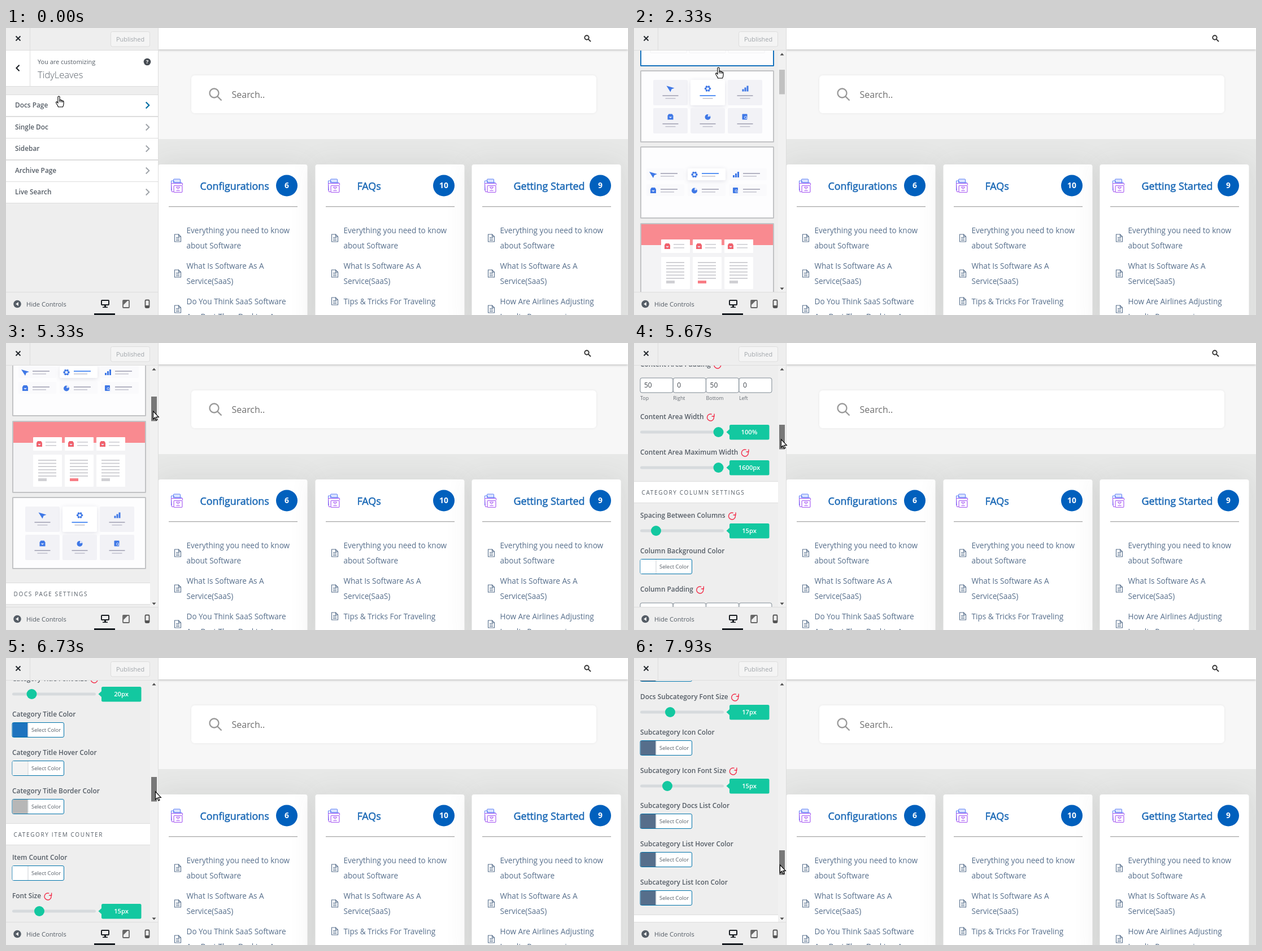
Recreate the animation shown at these times as an HTML page with a canvas. Size 1101 px wide and 509 px high, loop 8000 ms.

```html
<!DOCTYPE html>
<html lang="en">
<head>
<meta charset="utf-8">
<title>Docs page customizer</title>
<style>
html, body { margin: 0; width: 100%; height: 100%; overflow: hidden; }
canvas { display: block; width: 1101px; height: 509px; }
</style>
</head>
<body>
<canvas id="stage" width="1101" height="509"></canvas>
<script>
const g = document.getElementById('stage').getContext('2d');
const LOOP = 8000, STEPS_PER_MS = 0.015;
const BLUE = '#0073aa', GREEN = '#13c8a0', SLATE = '#566e8b', LINE = '#dddddd', LABEL = '#555d66';
const BRAND = 'TidyLeaves';

// ---- helpers ----
function rect(x, y, w, h, fill) { g.fillStyle = fill; g.fillRect(x, y, w, h); }

function box(x, y, w, h, r, fill, stroke, lw = 1) {
  g.beginPath();
  g.roundRect(x, y, w, h, r);
  if (fill) { g.fillStyle = fill; g.fill(); }
  if (stroke) { g.strokeStyle = stroke; g.lineWidth = lw; g.stroke(); }
}

function disc(x, y, r, fill) {
  g.beginPath(); g.arc(x, y, r, 0, 7); g.fillStyle = fill; g.fill();
}

function poly(color, lw, ...p) {
  g.beginPath();
  for (let i = 0; i < p.length; i += 2) g.lineTo(p[i], p[i + 1]);
  if (lw) { g.strokeStyle = color; g.lineWidth = lw; g.stroke(); }
  else { g.fillStyle = color; g.fill(); }
}

// y is the middle of the capitals; the baseline sits on a whole pixel
const baseline = (y, size) => Math.round(y + size * 0.36);

function text(s, x, y, size, color, weight = 400, align = 'left') {
  g.font = `${weight} ${size}px "Open Sans", "Noto Sans", sans-serif`;
  g.textAlign = align;
  g.fillStyle = color;
  g.fillText(s, x, baseline(y, size));
}

function chevron(x, y, dir, h, color) {
  poly(color, 2, x - dir * h * 0.5, y - h, x + dir * h * 0.5, y, x - dir * h * 0.5, y + h);
}

function withAlpha(a, draw) { g.save(); g.globalAlpha = a; draw(); g.restore(); }

function withShadow(color, blur, dy, draw) {
  g.save();
  g.shadowColor = color; g.shadowBlur = blur; g.shadowOffsetY = dy;
  draw();
  g.restore();
}

function track(keys, n) {
  let i = keys.findIndex(k => k[0] > n);
  if (i < 0) return keys[keys.length - 1].slice(1);
  if (i === 0) return keys[0].slice(1);
  const a = keys[i - 1], b = keys[i], p = (n - a[0]) / (b[0] - a[0]);
  return a.slice(1).map((v, j) => v + (b[j + 1] - v) * p);
}

const clamp = v => Math.max(0, Math.min(1, v));
const between = (n, a, b) => n >= a && n < b;

// ---- preview page ----
const columns = [
  [269.5, 'Configurations', '6', 'Do You Think SaaS Software', 'Are Best Than Desktop A'],
  [547.5, 'FAQs', '10', 'Tips & Tricks For Traveling', ''],
  [824.5, 'Getting Started', '9', 'How Are Airlines Adjusting', 'Loyalty Programming']
];

function magnifier(x, y, r, tail, lw, color) {
  g.beginPath(); g.arc(x, y, r, 0, 7);
  g.strokeStyle = color; g.lineWidth = lw; g.stroke();
  poly(color, lw, x + r * 0.7, y + r * 0.7, x + tail, y + tail);
}

function docIcon(x, y) {
  poly(SLATE, 1.1, x + 7, y - 6.5, x, y - 6.5, x, y + 6.5, x + 11, y + 6.5, x + 11, y - 2.5, x + 7, y - 6.5, x + 7, y - 2.5, x + 11, y - 2.5);
  for (const dy of [-1, 1.5, 4]) poly(SLATE, 1, x + 2.5, y + dy, x + 8.5, y + dy);
}

function folderIcon(x) {
  const violet = '#a558f2', blue = '#5b7cf6';
  box(x + 4, 268, 12, 7, 1, '#dbe5ff', blue, 1);
  poly(blue, 1, x, 288, x, 271, x + 4, 271, x + 6, 274, x + 19, 274);
  poly(violet, 1, x, 275.5, x + 20, 275.5, x + 20, 279);
  poly(violet, 1, x, 275.5, x + 1, 290.5, x + 5, 290.5);
  box(x + 4.5, 279.5, 15, 12, 1.5, '#fcf6ff', violet, 1.1);
  poly(violet, 1, x + 9, 282, x + 15, 282, x + 12, 286, x + 9, 282);
  poly(violet, 1, x + 9, 288.5, x + 15, 288.5);
}

function column([x, title, count, last1, last2]) {
  withShadow('rgba(70,75,75,.11)', 48, 0, () => box(x, 242, 264, 300, 4, '#fff'));
  folderIcon(x + 23);
  text(title, x + 74, 280.6, 17.85, '#1b69b6');
  g.strokeStyle = '#1b69b6'; g.lineWidth = 0.55;
  g.strokeText(title, x + 74, baseline(280.6, 17.85));
  disc(x + 227.5, 279.5, 19, '#0160bd');
  text(count, x + 227.5, 279, 13.8, '#fff', 700, 'center');
  rect(x + 18.5, 316, 228, 1.4, '#aeaeae');
  const lines = ['Everything you need to know', 'about Software', 'What Is Software As A', 'Service(SaaS)', last1, last2];
  const ys = [359, 386, 422, 449, 485, 512];
  lines.forEach((s, i) => text(s, x + 50, ys[i], 13.55, SLATE));
  docIcon(x + 29, 372.5);
  docIcon(x + 29, 435.5);
  docIcon(x + 29, last2 ? 498.5 : 484.5);
}

function preview() {
  rect(269, 38, 832, 159, '#f7f7f7');
  rect(269, 197, 832, 312, '#e7e8e7');
  withShadow('rgba(0,0,0,.28)', 4, 1, () => rect(269, 0, 832, 38, '#fff'));
  magnifier(1028, 17, 3.7, 7, 1.9, '#333');
  withShadow('rgba(0,0,0,.07)', 4, 0, () => box(328, 84, 717, 67, 6, '#fff'));
  magnifier(368.5, 115.5, 8, 13, 2.3, '#9a9a9a');
  text('Search..', 399.5, 118, 16, '#707070');
  g.save();
  g.beginPath(); g.rect(269, 197, 832, 312); g.clip();
  columns.forEach(column);
  g.restore();
}

// ---- sidebar frame ----
function topBar() {
  rect(0, 0, 269, 40, '#eee');
  rect(0, 39, 269, 1, LINE);
  rect(42, 0, 1, 39, LINE);
  poly('#23282d', 2, 17.5, 14.5, 25.5, 22.5);
  poly('#23282d', 2, 25.5, 14.5, 17.5, 22.5);
  box(185.5, 6.5, 69, 26.5, 3, '#f4f4f4', LINE);
  text('Published', 195, 20, 10.9, '#a0a5aa');
}

function footer() {
  rect(0, 468, 269, 41, '#eee');
  rect(0, 468, 269, 1, LINE);
  disc(20, 489.5, 6.8, '#555d66');
  poly('#eee', 0, 22, 486, 22, 493, 17, 489.5);
  text('Hide Controls', 36, 489.5, 11.15, '#555d66');
  box(169, 483, 13, 8, 1, null, '#191e23', 2);
  rect(174, 491, 3, 4, '#191e23');
  rect(171, 494.5, 9, 1.6, '#191e23');
  rect(156, 506, 37, 3, '#191e23');
  box(207, 483, 11, 13, 1, null, '#666', 1.8);
  poly('#666', 0, 208, 484, 215, 484, 208, 491);
  box(246.5, 482.5, 7, 13.5, 1.5, null, '#555', 1.8);
  rect(246, 492, 8, 3, '#555');
  rect(269, 0, 1, 509, LINE);
}

function statusBar() {
  box(-1.5, 492.5, 142, 20, [0, 4, 0, 0], '#dfe2e7', '#b9bcc2');
  text('https://tidyleaves.co/upgrade', 4, 501.5, 9.4, '#444b52');
}

// ---- first panel ----
function row(name, y, hot) {
  rect(0, y - 19, 269, 38.5, hot ? '#f3f3f5' : '#fff');
  rect(0, y - 19, 269, 1, LINE);
  rect(0, y + 19, 269, 1, LINE);
  if (hot) rect(0, y - 18, 3.5, 37, BLUE);
  text(name, 16, y, 11.85, hot ? BLUE : LABEL, 600);
  chevron(250.5, y, 1, 5.5, hot ? BLUE : '#a0a5aa');
}

function rootPanel(hover) {
  rect(0, 40, 269, 428, '#eee');
  rect(0, 40, 269, 63, '#fff');
  rect(0, 103, 269, 1, LINE);
  rect(42, 40, 1, 63, LINE);
  chevron(21, 71, -1, 5.2, '#191e23');
  text('You are customizing', 56, 60, 10.95, LABEL);
  text(BRAND, 56, 83.5, 16.5, LABEL, 300);
  disc(250, 60, 6.3, '#464c53');
  text('?', 250, 60, 9.5, '#fff', 700, 'center');
  ['Docs Page', 'Single Doc', 'Sidebar', 'Archive Page', 'Live Search']
    .forEach((s, i) => row(s, Math.round(137 + i * 38.6), false));
  withAlpha(hover, () => row('Docs Page', 137, true));
  chevron(250.5, 137, 1, 5.5, BLUE);
}

// ---- layout thumbnails ----
function bars(x, y, w, count, gap, color, h = 2.4) {
  for (let i = 0; i < count; i++) rect(x, y + i * gap, w, h, color);
}

const glyphs = [
  function plane(x, y, c) { poly(c, 0, x - 7, y - 5, x + 7, y - 1, x + 2, y + 1, x, y + 6); },
  function gear(x, y, c) {
    for (let a = 0; a < 6; a++) disc(x + 3.8 * Math.cos(a * 1.047), y + 3.8 * Math.sin(a * 1.047), 1.9, c);
    disc(x, y, 1.8, '#fff');
  },
  function chart(x, y, c) { [4, 7, 10].forEach((h, i) => rect(x - 5 + i * 4, y + 5 - h, 3, h, c)); },
  function letter(x, y, c) {
    poly(c, 0, x - 5, y - 2, x - 3, y - 5, x + 3, y - 5, x + 5, y - 2, x + 5, y + 5, x - 5, y + 5);
    poly('#e3e9fb', 0, x - 3, y, x + 3, y, x, y + 2.5);
  },
  function pie(x, y, c) { disc(x, y + 0.5, 5, c); poly('#e3e9fb', 0, x, y, x + 1, y - 6, x + 5, y - 1); },
  function page(x, y, c) { box(x - 5, y - 5, 9, 10, 1, c); magnifier(x + 1, y + 1, 2, 4.5, 1, '#e3e9fb'); }
];
const glyph = (kind, x, y, color = '#3f78e6') => glyphs[kind](x, y, color);

function columnsArt(top) {
  [29, 98, 167].forEach((x, i) => {
    box(x, top + 25, 64, 86, 1, '#fff', '#f1f1f4');
    rect(x, top + 25, 64, 12, '#3b7df6');
    rect(x + 7, top + 30, 41, 2, '#dce8ff');
    disc(x + 58, top + 31, 2.6, '#e6efff');
    bars(x + 9, top + 46, 46, 5, 8.6, '#90a4ae', 3);
    rect(x + 9, top + 92, 21, 7.5, i === 1 ? '#3b7df6' : '#90a4ae');
  });
}

function tile(x, y, w, h, raised, fill) {
  if (raised) withShadow('rgba(60,60,100,.14)', 8, 2, () => box(x, y, w, h, 2, '#fff'));
  else box(x, y, w, h, 2, fill);
}

function gridArt(top) {
  for (let i = 0; i < 6; i++) {
    const x = 34 + (i % 3) * 66, y = top + 16 + (i > 2 ? 50 : 0), mid = x + 30.5, up = i === 1;
    tile(x, y, 61, 45, up, '#f2f2f6');
    glyph(i, mid, y + 15.5);
    rect(mid - 14, y + 27, 28, 2, up ? '#5a94f4' : '#b3b3c2');
    rect(mid - 9, y + 32, 18, 1.6, '#c3c3cf');
  }
}

function rowsArt(top) {
  for (let i = 0; i < 6; i++) {
    const x = 22 + (i % 3) * 73, y = top + (i > 2 ? 66 : 38), up = i === 1;
    tile(x, y, 67, 21, up, '#fafafc');
    glyph(i, x + 12, y + 11);
    rect(x + 25, y + 8, 30, 2, up ? '#5a94f4' : '#b3b3c2');
    rect(x + 25, y + 13, 24, 1.6, '#c6c6d1');
  }
}

function pinkArt(top) {
  rect(12, top, 234, 126, '#f3f3f5');
  rect(12, top, 234, 38, '#f98a90');
  [48, 104, 160].forEach((x, i) => {
    box(x, top + 28, 51, 24, 1, '#fff');
    glyph(3, x + 11, top + 40, '#f0616c');
    bars(x + 22, top + 36, 19, 2, 6, '#cdcdd2', 1.6);
    box(x, top + 59, 51, 57, 1, '#fff');
    bars(x + 9, top + 68, 32, 6, 5.6, '#cbcbd0', 1.8);
    rect(x + 9, top + 101, 15, 5, i === 1 ? '#f87d85' : '#d0d0d4');
  });
}

const cards = [
  [145, 134, columnsArt], [288, 126, gridArt], [423, 126, rowsArt],
  [559, 126, pinkArt], [694, 126, gridArt]
];

// ---- settings list: kind, label, value, knob position or swatch ----
const settings = [
  ['head', 'Docs Page Settings'],
  ['color', 'Content Area Background Color', '#ffffff'],
  ['pad', 'Content Area Padding'],
  ['slide', 'Content Area Width', '100%', 149.5],
  ['slide', 'Content Area Maximum Width', '1600px', 149.5],
  ['head', 'Category Column Settings'],
  ['slide', 'Spacing Between Columns', '15px', 39],
  ['color', 'Column Background Color', '#ffffff'],
  ['pad', 'Column Padding'],
  ['color', 'Column Hover Color', '#ffffff'],
  ['slide', 'Category Icon Size', '40px', 65],
  ['head', 'Category Title'],
  ['slide', 'Category Title Font Size', '20px', 45.5],
  ['color', 'Category Title Color', '#1e73be'],
  ['color', 'Category Title Hover Color', '#f3f3f3'],
  ['color', 'Category Title Border Color', '#b7b7b7'],
  ['head', 'Category Item Counter'],
  ['color', 'Item Count Color', '#ffffff'],
  ['slide', 'Font Size', '15px', 59],
  ['color', 'Count Background Color', '#0160bd'],
  ['slide', 'Counter Width', '42px', 70],
  ['slide', 'Counter Height', '42px', 70],
  ['head', 'Docs List Settings'],
  ['color', 'Docs List Color', SLATE],
  ['color', 'Docs List Hover Color', SLATE],
  ['slide', 'Docs List Font Size', '15px', 59],
  ['pad', 'Docs List Margin'],
  ['slide', 'List Icon Font Size', '15px', 59],
  ['color', 'List Icon Color', SLATE],
  ['head', 'Docs Subcategory'],
  ['slide', 'Subcategory Spacing', '10px', 45],
  ['slide', 'Subcategory Indent', '10px', 45],
  ['color', 'Docs Subcategory Color', SLATE],
  ['slide', 'Docs Subcategory Font Size', '17px', 64],
  ['color', 'Subcategory Icon Color', SLATE],
  ['slide', 'Subcategory Icon Font Size', '15px', 59],
  ['color', 'Subcategory Docs List Color', SLATE],
  ['color', 'Subcategory List Hover Color', SLATE],
  ['color', 'Subcategory List Icon Color', SLATE],
  ['head', 'Explore Button']
];
const heights = { head: 50, color: 68, pad: 93, slide: 62.5 };

function resetIcon(x, y) {
  g.beginPath(); g.arc(x, y, 6, -0.5, 5.1);
  g.strokeStyle = '#f2304c'; g.lineWidth = 1.4; g.stroke();
  poly('#f2304c', 1.4, x + 6.5, y - 6.5, x + 6.5, y - 2, x + 2, y - 2);
}

const controls = {
  head(y, name) {
    rect(0, y - 11, 255, 38, '#fff');
    rect(0, y - 11, 255, 1, LINE);
    rect(0, y + 27, 255, 1, LINE);
    g.letterSpacing = '1.65px';
    text(name.toUpperCase(), 13.5, y + 9, 10, LABEL);
    g.letterSpacing = '0px';
  },
  color(y, name, swatch) {
    box(11, y + 14.5, 91.5, 26, 2.5, '#fff', BLUE);
    rect(11.5, y + 15, 27, 25, swatch);
    rect(38.5, y + 15, 1, 25, '#ccd0d4');
    text('Select Color', 45, y + 28, 9.45, LABEL);
  },
  pad(y) {
    ['Top', 'Right', 'Bottom', 'Left'].forEach((s, i) => {
      const x = 11 + i * 58.3;
      box(x, y + 24, 58, 26, 3, '#fff', '#7e8993');
      text(i % 2 ? '0' : '50', x + 7, y + 37, 12, '#40464d');
      text(s, x, y + 59.5, 8.9, '#666c73');
    });
  },
  slide(y, name, value, knob) {
    box(11, y + 24.5, 148, 5, 2.5, '#d6dadd');
    disc(knob, y + 27, 9, GREEN);
    box(169, y + 14, 70.5, 26.5, 2.5, GREEN);
    poly(GREEN, 0, 170, y + 21, 163.5, y + 27, 170, y + 33);
    text(value, 204, y + 27, 11.2, '#fff', 600, 'center');
  }
};

function settingsList(scroll) {
  let y = 856;
  for (const [kind, name, ...rest] of settings) {
    const at = Math.round(y - scroll);
    if (at > -70 && at < 490) {
      controls[kind](at, name, ...rest);
      if (kind !== 'head') {
        text(name, 11, at, 11.85, LABEL, 600);
        if (kind !== 'color') resetIcon(11 + g.measureText(name).width + 12, at + 1);
      }
    }
    y += heights[kind];
  }
}

function docsPanel(n, scroll) {
  rect(0, 40, 269, 428, '#eee');
  g.save();
  g.translate(0, -scroll);
  rect(0, 40, 255, 64, '#fff');
  rect(0, 40, 42, 64, '#f4f4f5');
  rect(0, 104, 255, 1, LINE);
  rect(42, 40, 1, 64, LINE);
  rect(0, 40, 3, 65, BLUE);
  chevron(21, 72, -1, 5.2, BLUE);
  text('Customizing', 56, 60, 10.95, LABEL);
  poly(LABEL, 0, 125.5, 57.5, 129.5, 60, 125.5, 62.5);
  text(BRAND, 136, 60, 10.95, LABEL);
  text('Docs Page', 56, 84, 17.1, LABEL, 300);
  text('Select Category Layout', 11, 130, 11.85, LABEL, 600);
  const firstHot = between(n, 20, 22) || between(n, 35, 45);
  const secondHot = between(n, 45, 52);
  cards.forEach(([y, h, art], i) => {
    rect(12, y, 235, h, '#fdfdfe');
    art(y);
    let edge = i ? '#c2c3c5' : GREEN;
    if (i === 0 && firstHot || i === 1 && secondHot) edge = '#1672bd';
    box(12, y, 235, h, 0.5, null, edge, 2);
  });
  const pro = between(n, 52, 64) ? 491 : between(n, 64, 70) ? 626 : 0;
  if (pro) text('Go Pro', 127.5, pro, 16, '#e9151d', 700, 'center');
  g.restore();
  settingsList(scroll);
}

const thumbTop = scroll => 53.5 + scroll / 10.2;

function scrollBar(scroll, drag) {
  rect(255, 40, 14, 428, '#f1f1f1');
  poly('#4d4d4d', 0, 258.5, 48.5, 265.5, 48.5, 262, 44.5);
  poly('#4d4d4d', 0, 258.5, 460.5, 265.5, 460.5, 262, 464.5);
  rect(257, Math.round(thumbTop(scroll)), 10, 43.5, drag ? '#787878' : '#c1c1c1');
}

// ---- pointer ----
const hand = new Path2D('M-1.6 1Q0-1 1.6 1V7Q3.2 5.6 4.2 7.4Q5.8 6.6 6.6 8.4Q8.6 7.8 8.6 10V13Q8.6 16 7 19H-1Q-2 16-4.6 12.5Q-5.6 9.6-3.4 9.8L-1.6 12Z');
const knuckles = new Path2D('M1.6 7V10.5M4.2 7.5V10.8M6.6 8.4V11');
const arrow = new Path2D('M0 0V14L3.2 11L5.4 16L7.5 15.1L5.3 10.4H9.9Z');

function pointer(x, y) {
  g.save();
  g.translate(x + 0.5, y);
  g.strokeStyle = '#000'; g.fillStyle = '#fff'; g.lineWidth = 1.1;
  const shape = x < 250 ? hand : arrow;
  g.fill(shape); g.stroke(shape);
  if (shape === hand) g.stroke(knuckles);
  g.restore();
}

const pointerKeys = [
  [0, 93, 121], [18, 93, 121], [19, 102, 167], [22, 200, 100], [24, 283, 78], [26, 262, 79],
  [33, 262, 100], [34, 200, 82], [35, 149, 70], [38, 149, 70], [39, 155, 60], [43, 155, 60],
  [46, 150, 110], [50, 150, 110], [53, 117, 255], [62, 117, 255], [63, 117, 277], [65, 117, 396],
  [69, 117, 396], [72, 284, 150], [75, 260, 100], [97, 260, 100], [101, 264, 100], [108, 262, 100],
  [116, 262, 100], [119, 258, 100]
];
const scrollKeys = [
  [27, 0], [32, 212], [77, 212], [80, 420], [82, 640], [85, 936], [87, 1000], [96, 1000],
  [101, 1608.5], [108, 2780], [116, 2780], [119, 2931.5]
];

// ---- scene ----
function draw(ms) {
  const n = Math.floor((ms + 5) * STEPS_PER_MS);
  const scroll = Math.round(track(scrollKeys, n)[0]);
  const drag = between(n, 27, 34) || n >= 76;
  const p = clamp((n - 8) / 5), slide = p * p * (3 - 2 * p);

  g.clearRect(0, 0, 1101, 509);
  preview();
  g.save();
  g.beginPath(); g.rect(0, 40, 269, 428); g.clip();
  if (slide < 1) {
    g.save(); g.translate(-269 * slide, 0); rootPanel(clamp(n / 3)); g.restore();
  }
  if (slide > 0) {
    g.save(); g.translate(269 * (1 - slide), 0); docsPanel(n, scroll); g.restore();
    if (slide === 1) scrollBar(scroll, drag);
  }
  g.restore();
  topBar();
  footer();
  if (between(n, 56, 70)) withAlpha(n === 56 ? 0.5 : 1, statusBar);
  const [x, y] = track(pointerKeys, n);
  pointer(Math.round(x), Math.round(drag ? thumbTop(scroll) + 26 : y));
}

const start = performance.now();
function tick() {
  draw((performance.now() - start) % LOOP);
  requestAnimationFrame(tick);
}
tick();
</script>
</body>
</html>
```
